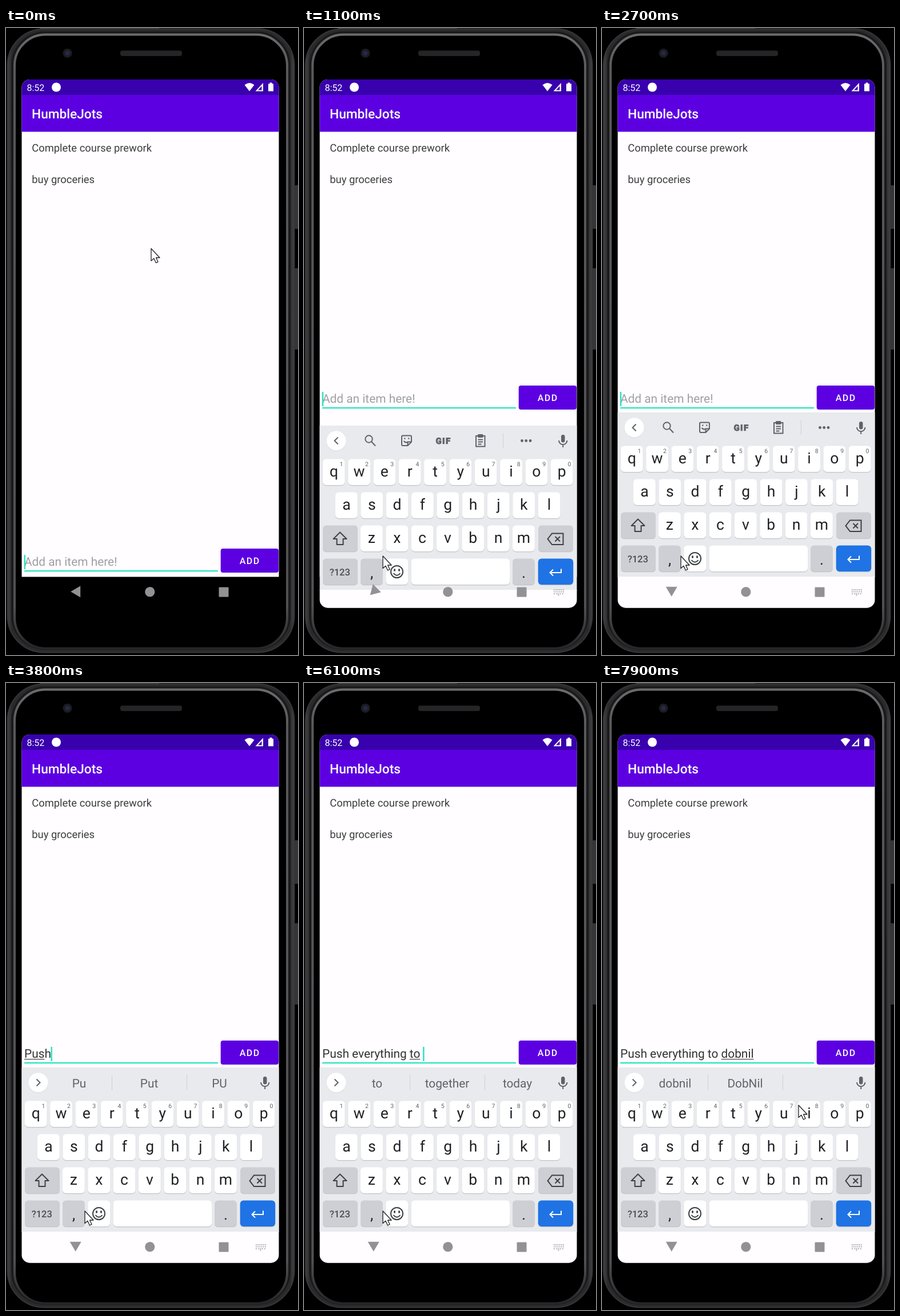
Write an HTML page that moves like this. It is 511 px wide and 1096 px high and loops after 8 s.

```html
<!DOCTYPE html>
<html lang="en">
<head>
<meta charset="utf-8">
<title>Todo app</title>
<style>
  html, body { margin: 0; width: 100%; height: 100%; overflow: hidden; background: #000; }
  svg { display: block; width: 100vw; height: 100vh; }
  text { font-family: Roboto, sans-serif; text-rendering: geometricPrecision; white-space: pre; }
  .mid { text-anchor: middle; }
  .medium { font-weight: 500; }
  .item { font-size: 18.4px; fill: #3c3c3c; }
  .field { font-size: 20.85px; }
  .chip { font-size: 20.8px; fill: #5f6368; text-anchor: middle; }
  .key { font-size: 26.5px; fill: #202124; text-anchor: middle; }
  .hint { font-size: 10.5px; fill: #5f6368; text-anchor: middle; }
  .icon { fill: none; stroke: #5f6368; stroke-width: 2; }
</style>
</head>
<body>
<svg viewBox="0 0 511 1096">
  <defs>
    <clipPath id="screen"><rect x="27.5" y="90" width="450" height="923.7" rx="14"/></clipPath>
    <linearGradient id="rim">
      <stop offset="0" stop-color="#444446"/>
      <stop offset=".015" stop-color="#2a2a2c"/>
      <stop offset=".985" stop-color="#2a2a2c"/>
      <stop offset="1" stop-color="#444446"/>
    </linearGradient>
    <linearGradient id="shine" x2="0" y2="1">
      <stop offset="0" stop-color="#6c6c6e"/>
      <stop offset=".06" stop-color="#58585a"/>
      <stop offset=".93" stop-color="#505052"/>
      <stop offset="1" stop-color="#262628"/>
    </linearGradient>
  </defs>

  <!-- Phone body -->
  <rect width="511" height="1096"/>
  <rect x="60" width="208" height="2" fill="#555"/>
  <g fill="#353537">
    <rect x="503" y="275" width="10" height="76" rx="2"/>
    <rect x="503" y="420" width="10" height="142" rx="2"/>
  </g>
  <rect x="2.5" y="1.5" width="502" height="1090" rx="64" fill="url(#rim)" stroke="#363638" stroke-width="2"/>
  <rect x="9" y="6" width="489" height="1081" rx="59" fill="#1a1a1b"/>
  <rect x="15" y="11.5" width="477" height="1073" rx="54" stroke="url(#shine)" stroke-width="4"/>
  <circle cx="107.5" cy="44" r="8" fill="#1c1c20"/>
  <circle cx="107.5" cy="44" r="4" fill="#25294a"/>
  <rect x="200" y="39.5" width="108" height="9.5" rx="4" fill="#252527"/>

  <g clip-path="url(#screen)">
    <rect x="27" y="90" width="451" height="869.4" fill="#fffdff"/>
    <rect x="27" y="90" width="451" height="28" fill="#3900ad"/>
    <rect x="27" y="117" width="451" height="64.4" fill="#5c00e2"/>
    <text x="36.5" y="109.5" font-size="16" fill="#fff">8:52</text>
    <g fill="#fff">
      <circle cx="88" cy="103.5" r="8"/>
      <path d="M417.5 99.5Q426 92.5 434.5 99.5L426 110.5Z"/>
      <path d="M450 96V110.5H436.5Z"/>
      <path d="M459 97.5h2.5v-2h4v2h2.5v13h-9z"/>
    </g>
    <path d="M441 108.5L447.5 101.5V108.5Z" fill="#3900ad"/>
    <text class="medium" x="45" y="158" font-size="22.7" fill="#fff">HumbleJots</text>
    <text class="item" x="45.2" y="216">Complete course prework</text>
    <text class="item" x="45.2" y="271">buy groceries</text>

    <g id="row">
      <text id="typed" class="field" x="32" y="655"></text>
      <rect id="mark" y="657" height="1.2" fill="#444"/>
      <rect x="32" y="663" width="339" height="2.2" fill="#25e3c0"/>
      <rect id="caret" y="636" width="2.4" height="25" fill="#25e3c0"/>
      <rect x="375.7" y="625" width="101.3" height="42" rx="4" fill="#5c00e2"/>
      <text class="medium" x="408.7" y="652.3" font-size="16" letter-spacing="1.43" fill="#fff">ADD</text>
    </g>

    <g id="board">
      <rect x="27" y="672" width="451" height="288" fill="#e8eaed"/>
      <rect x="27" y="959" width="451" height="200" fill="#fffdff"/>
      <g id="keys"></g>
      <circle cx="56.5" cy="699.5" r="17" fill="#d5d7da"/>
      <circle cx="56.5" cy="698.5" r="17" fill="#fff"/>
      <path id="chevron" class="icon"/>
      <g fill="#5f6368">
        <rect x="450" y="688" width="6.5" height="13.5" rx="3.2"/>
        <path class="icon" d="M446 698a7.2 7.2 0 0 0 14.4 0M453.2 705v5"/>
      </g>
      <g id="tools">
        <circle class="icon" cx="113.5" cy="695.5" r="6.2"/>
        <path class="icon" d="M118 700l7 7.5" stroke-width="2.6"/>
        <path class="icon" d="M173 689.5h13q2 0 2 2v9l-6.5 6.5H173q-2 0-2-2v-13.5q0-2 2-2zM188 700.5h-6.5v6.5M174.5 699q3.5 4 7 1.5M175 694.5h2.5M182 694.5h2.5"/>
        <text class="mid" x="244" y="703.7" font-size="15" font-weight="900" letter-spacing="1.3" fill="#5f6368" stroke="#5f6368" stroke-width=".7">GIF</text>
        <path class="icon" d="M301 690h15.5v18.5H301zM304.5 696.5h8.5M304.5 700.5h8.5M304.5 704.5h6"/>
        <rect x="304" y="687" width="9.5" height="6" rx="1.5" fill="#5f6368"/>
        <path d="M348.5 686v25" stroke="#d0d2d6"/>
        <g fill="#5f6368"><circle cx="381.5" cy="698.5" r="2.4"/><circle cx="388.7" cy="698.5" r="2.4"/><circle cx="396" cy="698.5" r="2.4"/></g>
      </g>
      <g id="chips">
        <path d="M185.5 685v27M316.5 685v27" stroke="#cdd0d4"/>
        <text class="chip" x="128" y="706.5"></text>
        <text class="chip" x="250.5" y="706.5"></text>
        <text class="chip" x="373.5" y="706.5"></text>
      </g>
    </g>
  </g>

  <!-- Navigation bar -->
  <g fill="#929195">
    <path id="back" d="M-8.5 0L8.5 -10V10Z"/>
    <circle cx="251.8" cy="985.7" r="8.6"/>
    <rect x="372.5" y="977.5" width="17" height="17" rx="1"/>
    <path id="switch" d="M437 982h18M437 985.5h18M437 989h3M441.5 989h9M452 989h3M444.5 991.5h3" stroke="#aaa9ad" stroke-width="1.8" stroke-dasharray="1.8 1.4"/>
  </g>
  <path id="mouse" d="M0 0V21.5L4.8 17.2L8.5 25L12 23.3L8.6 16H15Z" fill="#fff" stroke="#222" stroke-width="1.3" stroke-linejoin="round"/>
</svg>
<script>
const $ = id => document.getElementById(id);
const LOOP = 8000, STEP = 100, PITCH = 44.33;

/* Keyboard */
let markup = '';
const cap = (x, y, w, fill) => {
  markup += `<rect x="${x}" y="${y + 1.3}" width="${w}" height="45.5" rx="6" fill="#c2c4c8"/>
    <rect x="${x}" y="${y}" width="${w}" height="45.5" rx="6" fill="${fill}"/>`;
};
const label = (cls, x, y, s) => { markup += `<text class="${cls}" x="${x}" y="${y}">${s}</text>`; };
const letters = (row, x0, y) => [...row].forEach((c, i) => {
  const x = x0 + i * PITCH;
  cap(x, y, 38.8, '#fff');
  label('key', x + 19.4, y + 30.5, c);
});
const GREY = '#cdcfd4';
letters('qwertyuiop', 32.8, 730.5);
[...'1234567890'].forEach((n, i) => label('hint', 65.5 + i * PITCH, 743, n));
letters('asdfghjkl', 55, 788.5);
letters('zxcvbnm', 99, 846.5);
cap(33, 846.5, 61, GREY);
cap(410, 846.5, 61, GREY);
cap(33, 904.5, 61, GREY);
cap(99, 904.5, 38.8, GREY);
cap(143.3, 904.5, 38.8, '#fff');
cap(187.6, 904.5, 172.4, '#fff');
cap(365, 904.5, 38.8, GREY);
cap(409.7, 904.5, 61.5, '#1f73e4');
label('key', 118.5, 938, ',');
label('key', 384.5, 938, '.');
markup += `
  <text class="mid medium" x="62.8" y="934" font-size="16.5" fill="#4a4d51">?123</text>
  <g class="icon" style="stroke:#3c4043">
    <path d="M63 858.5L51.5 870H57.5V880H68.5V870H74.5Z" stroke-linejoin="round"/>
    <path d="M434 860.5H453.5V880H434L426.5 870.2ZM439.5 866l8.5 8.5M448 866l-8.5 8.5"/>
    <circle cx="162.5" cy="927.5" r="10.5"/>
    <path d="M156.5 930q6 7.5 12 0"/>
    <path d="M158.5 922.5v4M166.5 922.5v4" stroke-width="2.8"/>
    <path d="M450 922.5V929H431M436 923.5l-5.5 5.5 5.5 5.5" style="stroke:#fff"/>
  </g>`;
$('keys').innerHTML = markup;

/* time, text, underlined range, suggestions */
const A = 'Push ', B = A + 'everything ', C = B + 'to ';
const script = [
  [0, '', 0, 0, ''],
  [2900, 'P', 0, 0, ''],
  [3100, 'P', 0, 1, 'P,Pm,PM'],
  [3200, 'Pu', 0, 1, 'P,Pm,PM'],
  [3400, 'Pu', 0, 2, 'Pu,Put,PU'],
  [3700, 'Pus', 0, 2, 'Pu,Put,PU'],
  [3800, 'Push', 0, 3, 'Pu,Put,PU'],
  [3900, 'Push', 0, 4, 'Push,Pushing,Pushed'],
  [4100, A, 0, 4, 'Push,Pushing,Pushed'],
  [4300, A, 0, 0, 'the,up,it'],
  [4900, A + 'e', 5, 5, 'the,up,it'],
  [5000, A + 'ev', 5, 7, 'eve,every,even'],
  [5100, A + 'ever', 5, 8, 'eve,every,even'],
  [5200, A + 'every', 5, 10, 'ever,everything,every'],
  [5300, A + 'everyt', 5, 10, 'every,everything,everyone'],
  [5400, A + 'everyth', 5, 12, 'every,everything,everyone'],
  [5600, A + 'everythin', 5, 14, 'everything,everything,every'],
  [5700, A + 'everything', 5, 15, 'everything,everything’s,every'],
  [5800, B, 5, 15, 'everything,everything’s,every'],
  [5900, B + 't', 16, 16, 'is,in,to'],
  [6000, B + 'to', 16, 18, 'to,together,today'],
  [6100, C, 16, 18, 'to,together,today'],
  [6200, C, 0, 0, 'the,my,be'],
  [6400, C + 'd', 19, 19, 'the,my,be'],
  [6500, C + 'do', 19, 21, 'do,don’t,does'],
  [6600, C + 'dob', 19, 22, 'dob,doc,dobs'],
  [6800, C + 'dobn', 19, 23, 'dobn,down,'],
  [7000, C + 'dobni', 19, 24, 'dobni,down,'],
  [7200, C + 'dobnil', 19, 24, 'dobni,Dobni,'],
  [7300, C + 'dobnil', 19, 25, 'dobnil,DobNil,']
];
const blinks = [[400, 900], [1200, 1700], [2200, 2700], [4700, 4900], [7800, 8000]];

const typed = $('typed');
const widthOf = n => n ? typed.getSubStringLength(0, n) : 0;
const show = (id, on) => $(id).setAttribute('visibility', on ? 'visible' : 'hidden');
const move = (id, x, y, turn = 0) => $(id).setAttribute('transform', `translate(${x} ${y}) rotate(${turn})`);
const clamp = v => Math.max(0, Math.min(1, v));
const lerp = (a, b, p) => a + (b - a) * p;
const ease = p => p * p * (3 - 2 * p);

function drawField(t) {
  const [, text, from, to, words] = script.filter(s => s[0] <= t).pop();
  typed.textContent = text.replace(/ /g, '\u00a0') || 'Add an item here!';
  typed.setAttribute('fill', text ? '#333' : '#a09fa3');
  $('caret').setAttribute('x', 31.6 + widthOf(text.length));
  show('caret', !blinks.some(([a, b]) => t >= a && t < b));
  $('mark').setAttribute('x', 32 + widthOf(from));
  $('mark').setAttribute('width', Math.max(0, widthOf(to) - widthOf(from)));
  $('chevron').setAttribute('d', words ? 'M53.5 692.5l6 6-6 6' : 'M59.5 692.5l-6 6 6 6');
  $('tools').style.display = words ? 'none' : '';
  $('chips').style.display = words ? '' : 'none';
  const list = words.split(',');
  document.querySelectorAll('.chip').forEach((el, i) => { el.textContent = list[i] || ''; });
}

function drawPhone(t) {
  const open = t >= 1000;
  const p = clamp((t - 900) / 400);
  move('row', 0, open ? 0 : 285);
  $('board').style.display = open ? '' : 'none';
  move('board', 0, 184 * (1 - p) ** 3);
  move('back', 121.7, 985.3, -90 * ease(p));
  show('switch', open);
}

function drawMouse(t) {
  const p = ease(clamp(t / 900));
  const q = clamp((t - 7700) / 200);
  move('mouse', lerp(lerp(254, 138, p), 344, q), lerp(lerp(385.5, 923, p), 738, q));
}

const start = performance.now();
let last = -1;
function tick() {
  const t = Math.floor((performance.now() - start) % LOOP / STEP) * STEP;
  if (t !== last) {
    last = t;
    drawField(t);
    drawPhone(t);
    drawMouse(t);
  }
  requestAnimationFrame(tick);
}
tick();
</script>
</body>
</html>
```
